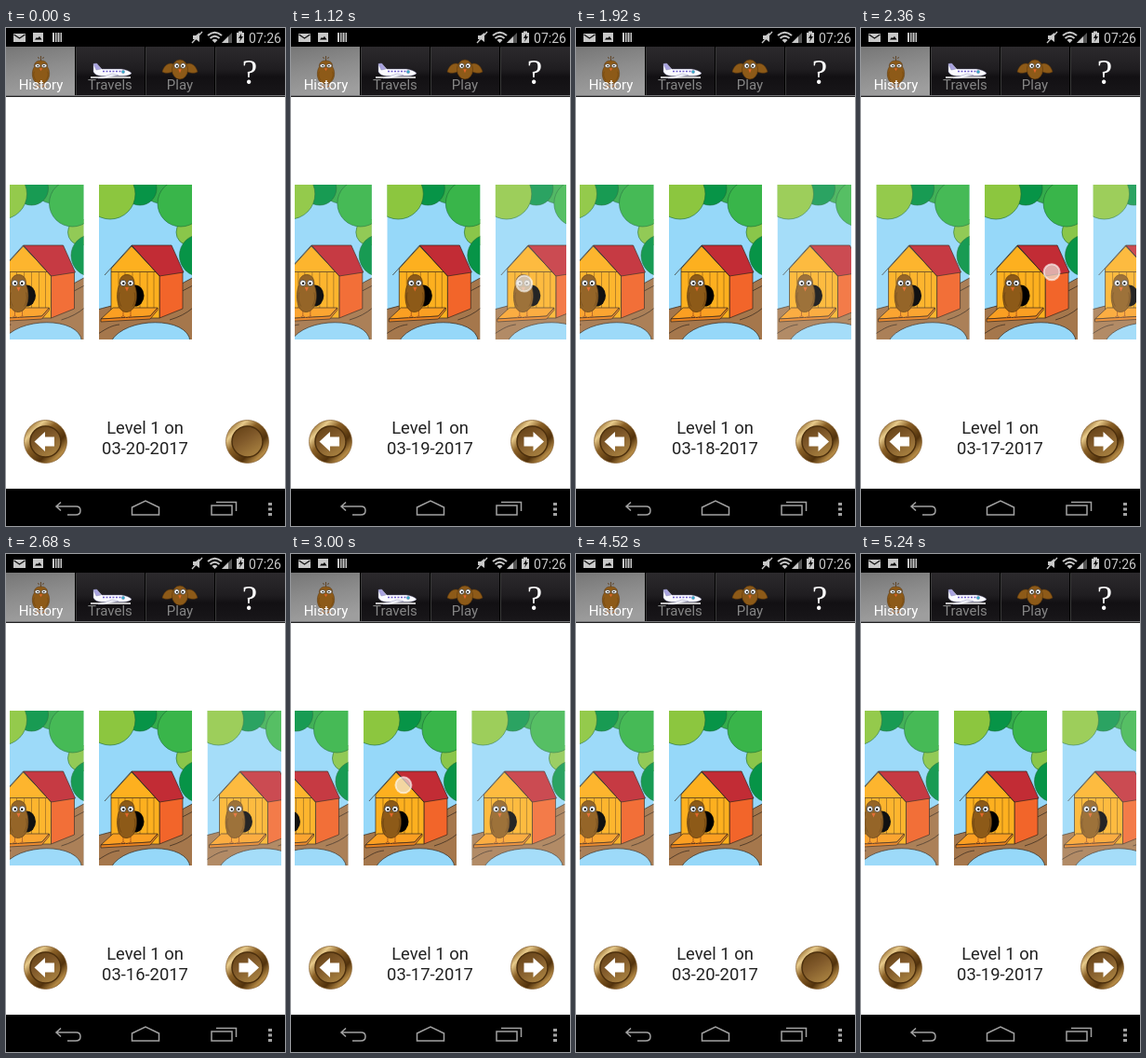
An HTML page that plays this animation: 300 px wide and 534 px high, repeating every 5.28 s.

```html
<!DOCTYPE html>
<html lang="en">
<head>
<meta charset="utf-8">
<title>Birdhouse history</title>
<style>
  html, body { margin: 0; width: 100%; height: 100%; overflow: hidden; background: #fff; }
  svg { display: block; }
  text { font-family: Roboto, "Open Sans", sans-serif; text-anchor: middle; }
  .inked { stroke: #33261c; stroke-width: .7; stroke-linejoin: round; }
  .line { fill: none; stroke: #33261c; stroke-width: .7; }
  .plank { fill: none; stroke: #7d5314; stroke-width: .6; }
  .leaf { stroke: #1c6a34; stroke-width: .6; }
</style>
</head>
<body>
<svg id="stage" width="100%" height="100%" viewBox="0 0 300 534">
  <defs>
    <linearGradient id="tabDark" x2="0" y2="1">
      <stop stop-color="#2c2a2d"/><stop offset=".45" stop-color="#1f1d20"/>
      <stop offset=".6" stop-color="#121013"/><stop offset="1" stop-color="#19171a"/>
    </linearGradient>
    <linearGradient id="tabLight" x2=".25" y2="1">
      <stop stop-color="#767676"/><stop offset=".5" stop-color="#8c8c8c"/><stop offset="1" stop-color="#9e9e9e"/>
    </linearGradient>
    <linearGradient id="rim" x2="1" y2="1">
      <stop offset=".1" stop-color="#8a6126"/><stop offset=".24" stop-color="#e8cb8c"/>
      <stop offset=".4" stop-color="#8a6026"/><stop offset=".66" stop-color="#52320c"/>
      <stop offset=".82" stop-color="#b58a45"/><stop offset="1" stop-color="#6b4717"/>
    </linearGradient>
    <linearGradient id="dish" x2=".6" y2="1">
      <stop stop-color="#5f3d12"/><stop offset=".5" stop-color="#80592a"/><stop offset="1" stop-color="#a67f3f"/>
    </linearGradient>
    <clipPath id="window"><rect x="4" y="168" width="292" height="166"/></clipPath>

    <g id="face">
      <g fill="#fff" stroke="#333" stroke-width=".8"><circle cx="-4" r="3.200"/><circle cx="4" r="3.200"/></g>
      <circle cx="-3.700" cy=".2" r="1.200"/><circle cx="3.700" cy=".2" r="1.200"/>
      <path d="M-2 4.500H2L0 9Z" fill="#e2662b"/>
    </g>
    <g id="bird">
      <path d="M-4 29v7m-3 1 3-2 3 2M4 29v7m-3 1 3-2 3 2" fill="none" stroke="#b5601c"/>
      <path d="M0-9C6-9 8.500-4 8 2C12 9 12 30 0 31S-12 9-8 2C-8.500-4-6-9 0-9Z" fill="#8d5a18" stroke="#5a370d" stroke-width=".7"/>
      <path d="M-8 10C-10 16-8 22-6 25M8 10C10 16 8 22 6 25" fill="none" stroke="#69410f" stroke-width=".7"/>
      <use href="#face"/>
    </g>

    <symbol id="card" viewBox="0 0 100 166">
      <rect width="100" height="166" fill="#96d8f9"/>
      <g class="leaf">
        <circle cx="97" cy="51" r="14" fill="#8ac64a"/>
        <circle cx="109" cy="76" r="22.500" fill="#079447"/>
        <circle cx="66" cy="1" r="19" fill="#34ac4b"/>
        <circle cx="44" cy="4" r="18" fill="#079447"/>
        <circle cx="12" cy="10" r="27" fill="#8cc63f"/>
        <circle cx="88" cy="20" r="25" fill="#39b54a"/>
      </g>
      <path class="inked" d="M-2 134C28 126 62 118 80 111L102 99V168H98C96 141 28 141 13 168H-2Z" fill="#a5774c"/>
      <path class="line" d="M-1 160C10 153 14 151 22 150M84 117 101 108M76 145C86 142 94 138 101 132" stroke-width=".5"/>
      <path class="inked" d="M65 97 90 93V133L65 143Z" fill="#f2652a"/>
      <path class="inked" d="M13 90 35 66 65 97V143H54L13 134Z" fill="#fdb01f"/>
      <path class="plank" d="M21 94V132M28 94V132M36 94V132M44 94V132M52 94V132M59 94V132"/>
      <path class="line" d="M13 93.500H62"/>
      <path class="inked" d="M35 65H78L91 94 65 98Z" fill="#c22c35"/>
      <path class="line" d="M6 97 35 65 65 98"/>
      <ellipse cx="38.500" cy="119" rx="10" ry="11.500"/>
      <path class="inked" d="M2 144 15 132H63L55 141Z" fill="#fb9f22"/>
      <path class="inked" d="M2 144 55 141 63 132V134.500L55 144 2 147Z" fill="#ec8420"/>
      <use href="#bird" x="30" y="105.500"/>
    </symbol>

    <g id="knob">
      <circle r="23" fill="url(#rim)" stroke="#80592a" stroke-width=".7"/>
      <circle r="16.500" fill="url(#dish)" stroke="#4d300d" stroke-width="1.500"/>
    </g>
    <path id="arrow" d="M-11.500 0 0-10.500V-5H10V5H0V10.500Z" fill="#fff"/>
  </defs>

  <rect width="300" height="534" fill="#fff"/>
  <g clip-path="url(#window)" id="strip"></g>
  <circle id="finger" r="8.500" fill="#eee8de" fill-opacity=".68" stroke="#fff" stroke-opacity=".6" stroke-width="2"/>

  <!-- status bar -->
  <rect width="300" height="20"/>
  <g fill="#c8c8c8">
    <path d="M8 6H21V15H8Z"/><path d="M8.500 7 14.500 11 20.500 7" fill="none" stroke="#111" stroke-width="1.2"/>
    <path d="M29 5H40V15H29ZM31 12.500H38.500L36 9 34 11 33 10Z" fill-rule="evenodd"/>
    <path d="M50 5h2v10h-2zM53 5h1.500v10H53zM55.500 5h2v10h-2zM58.500 5H60v10h-1.500z"/>
    <path d="M201 8h3l4-3v10l-4-3h-3z"/><path d="M200 16 211 4" stroke="#c8c8c8" stroke-width="1.3"/>
    <path d="M217 8Q224.500 1.500 232 8M219.500 11Q224.500 6.500 229.500 11" fill="none" stroke="#c8c8c8" stroke-width="2"/>
    <path d="M221.500 13Q224.500 10.500 227.500 13L224.500 16Z"/>
    <path d="M232 16 243 5V16Z" fill="#555"/><path d="M232 16 239 9V16Z"/>
    <path d="M248 5h2V3.500h4V5h2v11h-8z"/><path d="M253 6 250 11h2l-1 4 4-6h-2z" fill="#111"/>
    <text x="278.500" y="15.500" font-size="14">07:26</text>
  </g>

  <!-- tabs -->
  <rect y="20" width="300" height="54" fill="url(#tabDark)"/>
  <rect y="20" width="74" height="53" fill="url(#tabLight)"/>
  <path d="M74.500 20V73M149.500 20V73M224.500 20V73" stroke="#000"/>
  <path d="M75.500 21V72M150.500 21V72M225.500 21V72" stroke="#393939"/>
  <path d="M0 72.500H300" stroke="#77777a"/><path d="M0 73.500H300" stroke="#222"/>
  <use href="#bird" transform="translate(37.500 40.500) scale(.88 .62)"/>
  <path d="M37.500 35V30m-2 3-1-2m5 2 1-2" stroke="#573510" stroke-width=".8"/>
  <g stroke="#8384ac" stroke-width=".4">
    <path d="M94 38.500 97.500 38 103 44H124Q132 45 135 48.500Q133 51 126 51.500H103Q96 51 94 47Z" fill="#fafaff"/>
    <path d="M94 38.500 97.500 38 102 44 97 45Z" fill="#a9a3e0"/>
    <path d="M114 49 99 54 105 54 121 50.500Z" fill="#f2f3fa"/>
    <path d="M91 53H134" stroke="#fff" stroke-width="1.3"/>
    <path d="M104 46.500H125" stroke="#7061c9" stroke-width="1.4" stroke-dasharray="2 1.500"/>
    <circle cx="126" cy="47" r="1.700" fill="#32aac8"/>
  </g>
  <g fill="#8d5a18" stroke="#5a370d" stroke-width=".6">
    <path d="M181 39C175 36 170 40 168 47C171 49 178 49 181 45ZM193 39C199 36 204 40 206 47C203 49 196 49 193 45Z"/>
    <ellipse cx="187" cy="44.500" rx="8.500" ry="10.500"/>
  </g>
  <use href="#face" transform="translate(187 40.500) scale(.85)"/>
  <g font-size="15">
    <text x="37.500" y="66" fill="#fff">History</text>
    <text x="112" y="66" fill="#858585">Travels</text>
    <text x="187" y="66" fill="#858585">Play</text>
  </g>
  <text x="262" y="59.500" font-size="37" fill="#fff" style="font-family:'Liberation Serif',serif">?</text>

  <!-- footer controls -->
  <g font-size="18.400" fill="#222">
    <text x="149.500" y="435">Level 1 on</text>
    <text id="date" x="149.500" y="457"></text>
  </g>
  <use href="#knob" x="42.500" y="443.500"/>
  <use href="#arrow" x="42" y="443.500"/>
  <use href="#knob" x="259.500" y="443.500"/>
  <use id="next" href="#arrow" transform="translate(260.500 443.500) scale(-1 1)"/>

  <!-- system navigation -->
  <rect y="494" width="300" height="40"/>
  <g fill="none" stroke="#a2a2a2" stroke-width="1.500">
    <path d="M59 508.500 54 513 59 517.500M54 513H75.500Q80 513 80 517.500T75 522H66"/>
    <path d="M135.500 514 150 507 164.500 514V522H135.500Z"/>
    <path d="M221 512H243V522H221ZM226 508.500H247.500V518"/>
  </g>
  <path d="M282 509h4v3h-4zM282 514.500h4v3h-4zM282 520h4v3h-4z" fill="#a2a2a2"/>
</svg>
<script>
const LOOP = 5280, STEP = 40, PITCH = 116.5, CARDS = 7;

// Each swipe drags the strip with the finger, then settles on a card.
const swipes = [
  { start: 880,  end: 1200, rest: 1340, x: [131, 273],    y: [280, 273], card: 1 },
  { start: 1440, end: 1760, rest: 1900, x: [165, 293],    y: [277, 268], card: 2 },
  { start: 2030, end: 2590, rest: 2680, x: [55.5, 292],   y: [270, 257], card: 4 },
  { start: 2720, end: 3220, rest: 3280, x: [259.5, 24.5], y: [262, 238], card: 2 },
  { start: 3300, end: 3600, rest: 3720, x: [265, 40],     y: [264, 244], card: 0 },
  { start: 4920, end: 5130, rest: 5230, x: [130, 240],    y: [280, 272], card: 1 }
];

const byId = id => document.getElementById(id);
const mix = ([a, b], p) => a + (b - a) * p;
const clamp = p => Math.min(1, Math.max(0, p));
const smooth = p => p * p * (3 - 2 * p);
const easeOut = p => 1 - (1 - p) ** 3;

const cards = Array.from({ length: CARDS }, () => {
  const card = document.createElementNS('http://www.w3.org/2000/svg', 'use');
  for (const [key, value] of Object.entries({ href: '#card', y: 168, width: 100, height: 166 }))
    card.setAttribute(key, value);
  return byId('strip').appendChild(card);
});

function poseAt(time) {
  let scroll = 0, finger = null;
  for (const { start, end, rest, x, y, card } of swipes) {
    if (time < start) break;
    const drag = smooth(clamp((time - start) / (end - start)));
    const dragged = scroll + (x[1] - x[0]) * drag;
    const settle = easeOut(clamp((time - end) / (rest - end)));
    scroll = mix([dragged, card * PITCH], settle);
    finger = time < end ? [mix(x, drag), mix(y, drag)] : null;
  }
  return { scroll, finger };
}

// Later cards sit to the right and look paler than earlier ones.
function opacityOf(index, selected) {
  if (index === selected) return 1;
  return index > selected ? .93 : .85;
}

function draw() {
  const time = Math.floor(performance.now() % LOOP / STEP) * STEP;
  const { scroll, finger } = poseAt(time);
  const selected = Math.max(0, Math.round(scroll / PITCH));
  cards.forEach((card, i) => {
    card.setAttribute('x', 100 + scroll - i * PITCH);
    card.setAttribute('opacity', opacityOf(i, selected));
  });
  byId('date').textContent = `03-${20 - selected}-2017`;
  byId('next').style.display = selected ? '' : 'none';
  byId('finger').style.display = finger ? '' : 'none';
  if (finger) byId('finger').setAttribute('transform', `translate(${finger})`);
  requestAnimationFrame(draw);
}
draw();
</script>
</body>
</html>
```
